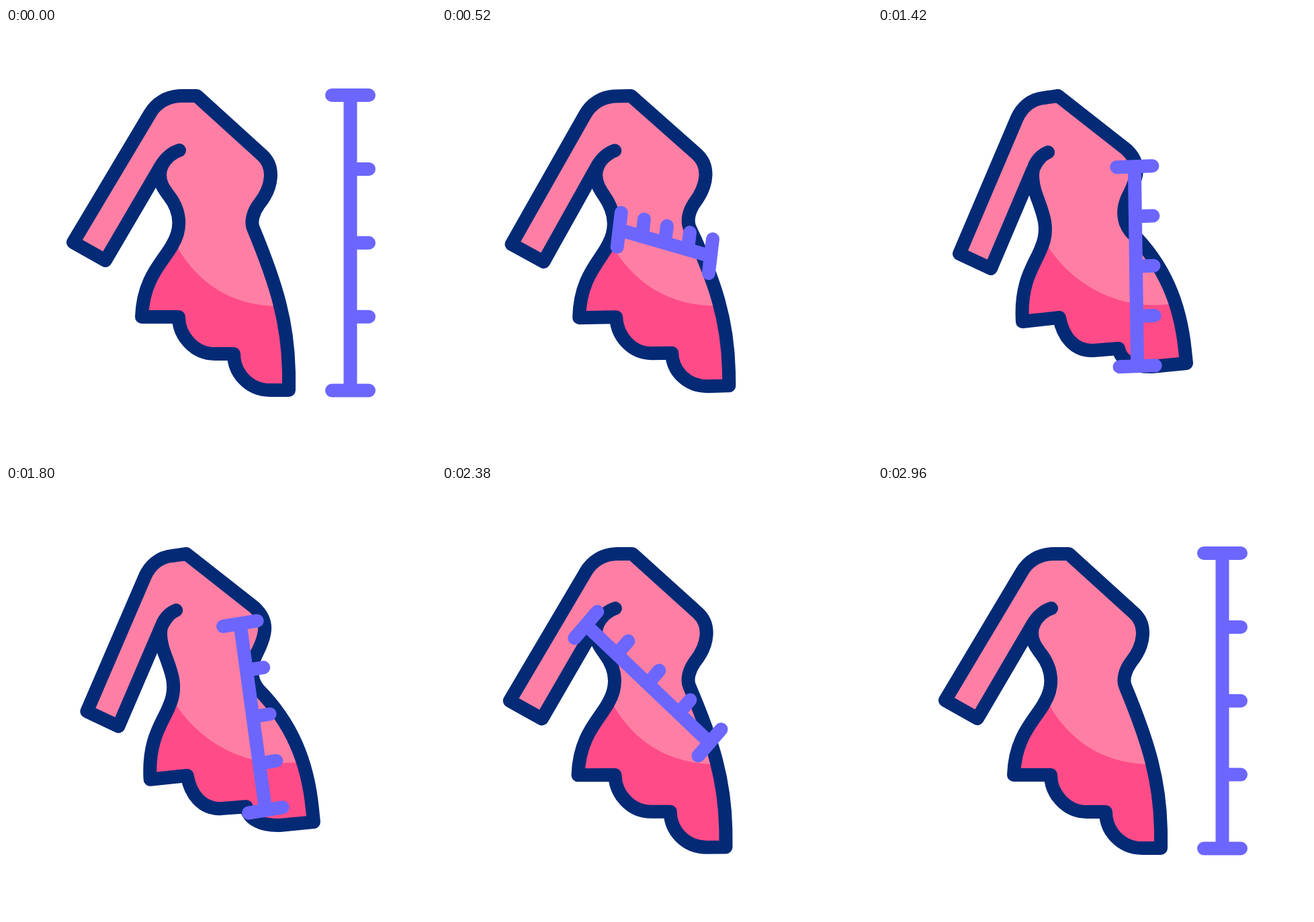
An HTML page for the animation above (3 s loop, 640 by 640 pixels).

```html
<!DOCTYPE html>
<html lang="en">
<head>
<meta charset="utf-8">
<title>Dress and measuring tape</title>
<style>
  html, body { margin: 0; height: 100%; overflow: hidden; background: #fff; }
  svg { display: block; width: 100vw; height: 100vh; }
  .line { fill: none; stroke-width: 20; stroke-linecap: round; stroke-linejoin: round; }
</style>
</head>
<body>
<svg viewBox="0 0 640 640">
  <clipPath id="inside"><path class="dress"/></clipPath>
  <path class="dress" fill="#ff7fa4"/>
  <path id="skirt" fill="#ff4c88" clip-path="url(#inside)"/>
  <path class="dress line" stroke="#042a76"/>
  <path id="tape" class="line" stroke="#6c66fe"/>
</svg>
<script>
const LOOP = 3000;

// Outline from the armpit down the left side, along the hem, up the right side and round the sleeve
const straight = `M258 182 C240 188 229 204 229 219 C229 232 236 241 242 249
  C260 272 262 298 248 322 C236 346 204 370 202 430 L257 430 C257 458 280 485 311 485
  L339 485 C339 514 362 539 393 539 L421 539 L421 520 C421 440 402 380 368 298
  C364 288 368 274 376 263 C398 236 400 206 381 189 L284 101 L261 101
  C240 101 223 112 214 128 L100 319 L148 346 L230 206 C236 196 246 186 258 182`;
const bent = `M253 185 C238 191 230 206 230 219 C230 230 232 239 236 250
  C247 279 255 300 243 327 C235 350 211 375 215 437 L270 431 C275 459 292 481 320 480
  L358 477 C361 494 378 505 408 504 L459 499 L457 480 C450 410 426 352 376 303
  C363 287 364 268 372 251 C389 218 390 200 370 181 L268 101 L247 104
  C227 106 214 119 207 134 L121 336 L168 358 L230 212 C235 201 241 190 253 185`;
const skirtStraight = 'M248 313 C275 368 325 414 407 414 L480 414 L480 560 L185 560 L185 313Z';
const skirtBent = 'M243 307 C270 365 345 425 441 410 L480 410 L480 560 L185 560 L185 307Z';

// Tape poses: first end x, y, last end x, y, tick vector x, y
const rest = [512.5, 100, 512.5, 539.5, 27.5, 0];
const waist = [253, 309, 395, 331, 2, -26.6];
const waistBent = [253, 309.5, 389, 338, 3, -24.7];
const length = [387, 202, 386, 510, 27.5, 0];
const diagonal = [187, 216.5, 388, 367.5, 16, -21.5];
const moves = [
  [0, 712, waist],
  [600, 1000, waistBent],
  [900, 1608, length],
  [1600, 2110, diagonal],
  [2090, 3000, rest]
];

const mix = (a, b, k) => a + (b - a) * k;
const ease = u => u < .5 ? 8 * u ** 4 : 1 - 8 * (1 - u) ** 4;
const progress = (t, start, end) => ease(Math.min(1, Math.max(0, (t - start) / (end - start))));

function mixPath(a, b, k) {
  const goal = b.match(/\d+/g);
  let i = 0;
  return a.replace(/\d+/g, n => mix(+n, +goal[i++], k).toFixed(2));
}

function tapePath([ax, ay, bx, by, hx, hy]) {
  let d = `M${ax} ${ay}L${bx} ${by}`;
  for (let i = 0; i <= 4; i++) {
    const x = mix(ax, bx, i / 4), y = mix(ay, by, i / 4);
    const back = i % 4 ? 0 : 1;
    d += `M${x - hx * back} ${y - hy * back}L${x + hx} ${y + hy}`;
  }
  return d;
}

const dress = document.querySelectorAll('.dress');
const skirt = document.getElementById('skirt');
const tape = document.getElementById('tape');

function draw(now) {
  const t = now % LOOP;
  const bend = progress(t, 20, 1340) - progress(t, 1515, 2690);
  const outline = mixPath(straight, bent, bend);
  dress.forEach(p => p.setAttribute('d', outline));
  skirt.setAttribute('d', mixPath(skirtStraight, skirtBent, bend));

  const pose = moves.reduce((from, [start, end, to]) => {
    const k = progress(t, start, end);
    return from.map((v, i) => mix(v, to[i], k));
  }, rest);
  tape.setAttribute('d', tapePath(pose));
  requestAnimationFrame(() => draw(performance.now()));
}
draw(performance.now());
</script>
</body>
</html>
```
